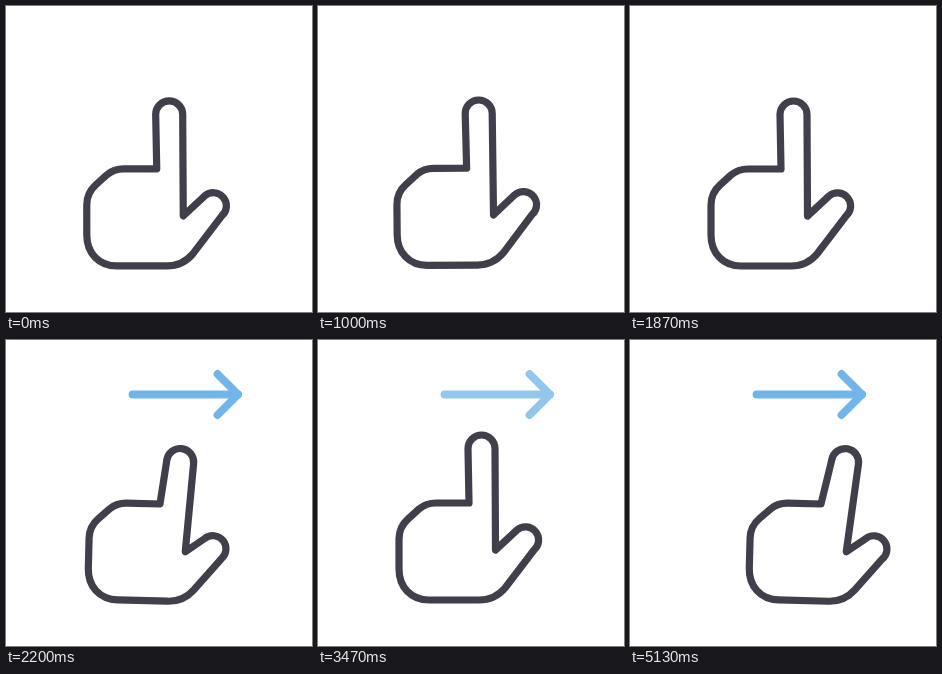
Recreate the animation shown at these times as an HTML page. Size 306 by 306 pixels, loop 5.39 s.

```html
<!DOCTYPE html>
<html lang="en">
<head>
<meta charset="utf-8">
<title>Swipe right gesture</title>
<style>
  html, body { margin: 0; height: 100%; overflow: hidden; background: #fff; }
  svg { display: block; width: 100vw; height: 100vh; }
  path { fill: none; stroke-linecap: round; stroke-linejoin: round; }
  #hand { stroke: #413f49; stroke-width: 7.2; }
  #arrow { stroke: #72b5e8; stroke-width: 7.8; }
</style>
</head>
<body>
<svg viewBox="0 0 306 306">
  <g id="arrow"><path id="shaft"/><path id="head"/></g>
  <path id="hand"/>
</svg>
<script>
const LOOP = 5390, STEP = 200 / 3;
const SWIPE = 990, LEAD = 5, LAST_SWIPE = 4 * SWIPE, HOLD = 335;

const el = id => document.getElementById(id);
const ramp = (t, from, to) => Math.min(1, Math.max(0, (t - from) / (to - from)));
const ease = (t, from, to) => (1 - Math.cos(Math.PI * ramp(t, from, to))) / 2;
const bell = u => 4 * u * (1 - u);

function drawHand(t) {
  const windUp = ease(t, 0, 120), swipe = ease(t, 125, 295), back = ease(t, 368, 459);
  const press = ease(t, 65, 123) - back;
  const x = -62 * windUp + 102 * swipe - 40 * back;
  const y = press - 6 * bell(windUp) - 2 * bell(back);
  const turn = -12 * windUp + 13.5 * ease(t, 115, 230) - 1.5 * back;

  // The pressed finger shortens and leans with the swipe; the thumb sinks.
  const dx = 10.5 * (swipe - back), lean = Math.atan2(dx, 70), r = 13.5;
  const cx = 163.5 + dx, cy = 108.5 + 12 * press;
  const ox = r * Math.cos(lean), oy = r * Math.sin(lean);
  const tx = -2.5 * press, ty = 6.5 * press;
  el("hand").setAttribute("d",
    `M177.5 210L${cx + ox} ${cy + oy}A${r} ${r} 0 0 0 ${cx - ox} ${cy - oy}L151 163` +
    "H118Q108 163 101 169L90 179Q81 187 81 199V229C81 247 93 260 111 260" +
    `H161Q177 260 187 248L${216 + tx} ${210 + ty}A13 13 0 0 0 ${199 + tx} ${190 + ty}Z`);
  el("hand").setAttribute("transform", `translate(${x} ${y}) rotate(${turn} 151 163)`);
}

function drawArrow(t) {
  const reach = ramp(t, 65, 147), barb = 20.5 * ramp(t, 147, 195);
  el("shaft").setAttribute("d", reach ? `M126.5 54.5h${105.5 * reach}` : "");
  el("head").setAttribute("d", barb
    ? `M${232 - barb} ${54.5 - barb}L232 54.5L${232 - barb} ${54.5 + barb}` : "");
  el("arrow").setAttribute("opacity", 1 - ramp(t, 475, 605));
}

function frame(now) {
  // 15 pictures a second, rounded to hundredths
  const time = Math.round(Math.floor((now % LOOP + 3.4) / STEP) * STEP / 10) * 10 + LEAD;
  // The last swipe stays at its right end until the loop restarts.
  const t = time < LAST_SWIPE ? time % SWIPE : Math.min(time - LAST_SWIPE, HOLD);
  drawArrow(t);
  drawHand(t);
  requestAnimationFrame(() => frame(performance.now() - start));
}

const start = performance.now();
frame(0);
</script>
</body>
</html>
```
